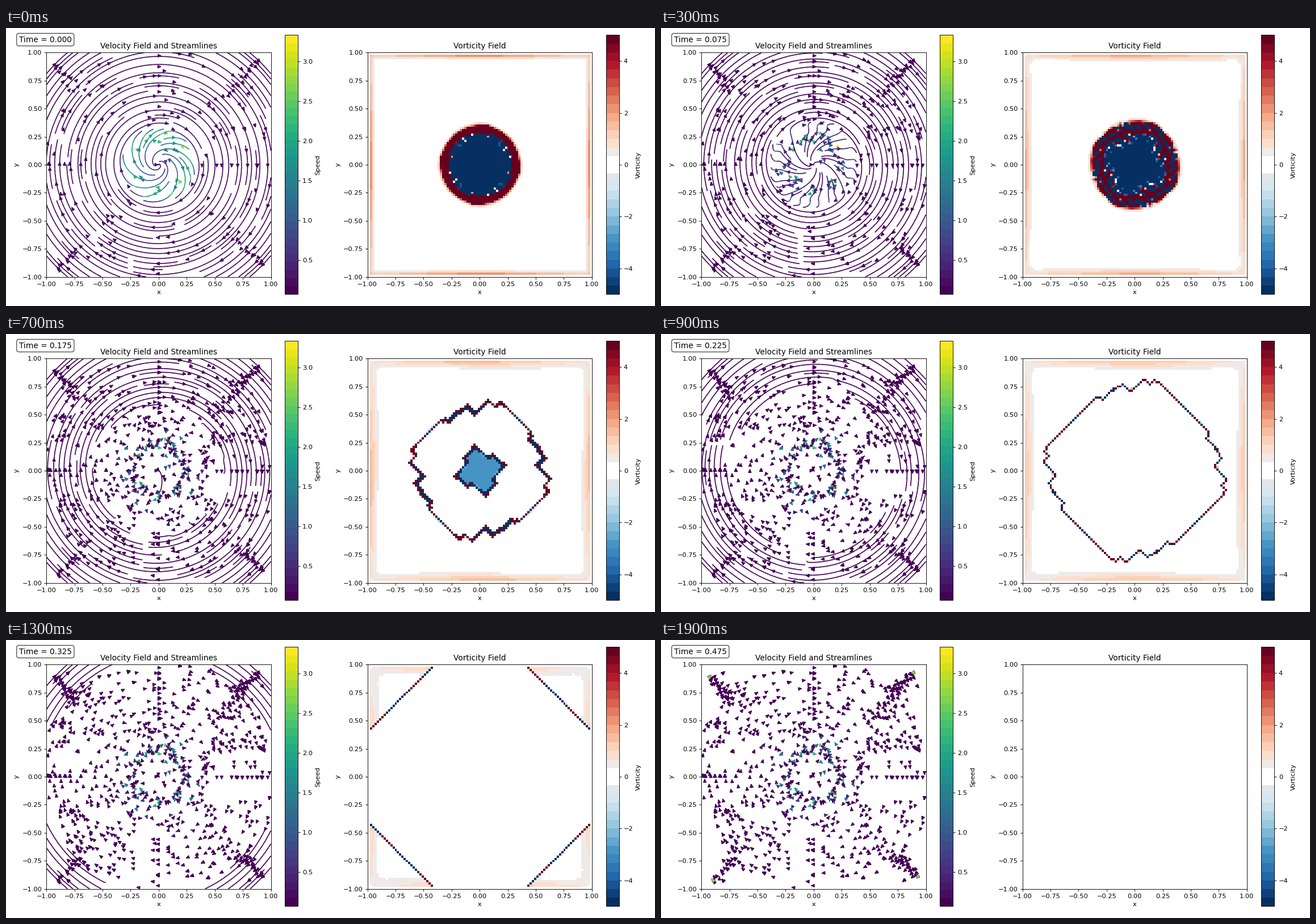
A matplotlib script for the animation above (2000 ms loop, 1143 by 490 pixels).

```python
import numpy as np
import matplotlib.pyplot as plt
from matplotlib.animation import FuncAnimation
from matplotlib.cm import ScalarMappable
from matplotlib.collections import PathCollection
from matplotlib.colors import ListedColormap, Normalize

W, H, DPI = 1143, 490, 81.65
PT = DPI / 72               # pixels per point
N, DT, NU, R = 100, 0.005, 0.005, 0.3
STEPS, FRAMES = 5, 20       # solver steps per frame
LEAD = 2                    # layers computed before the first shown frame
HUGE = 1e100

x = np.linspace(-1, 1, N)
dx = x[1] - x[0]
X, Y = np.meshgrid(x, x)


def ddx(f):
    return (f[1:-1, 2:] - f[1:-1, :-2]) / (2 * dx)


def ddy(f):
    return (f[2:, 1:-1] - f[:-2, 1:-1]) / (2 * dx)


def laplacian(f):
    return (f[1:-1, 2:] + f[1:-1, :-2] + f[2:, 1:-1] + f[:-2, 1:-1]
            - 4 * f[1:-1, 1:-1]) / dx**2


def initial_field():
    """Clockwise vortex: rigid core with a weak 1/r tail."""
    r = np.hypot(X, Y)
    spin = np.where(r < R, 1 / R**2, R**2 / r**2)
    return spin * Y, -spin * X


def step(u, v):
    """Explicit central-difference advection and diffusion, no-slip walls.

    The scheme is unstable here: noise grows in the ring until it overflows,
    and the invalid cells then spread by one cell per step.
    """
    ui, vi = u[1:-1, 1:-1], v[1:-1, 1:-1]
    out = []
    for f in (u, v):
        g = np.zeros_like(f)
        g[1:-1, 1:-1] = (f[1:-1, 1:-1] - DT * (ui * ddx(f) + vi * ddy(f))
                         + NU * DT * laplacian(f))
        out.append(g)
    return out


def vorticity(u, v):
    w = np.zeros_like(u)
    w[1:-1, 1:-1] = ddx(v) - ddy(u)
    w[~np.isfinite(w)] = np.nan
    return np.clip(w, -5, 5)


def solve():
    u, v = initial_field()
    states = [(u, v)]
    with np.errstate(all="ignore"):
        for _ in range(FRAMES + LEAD - 1):
            for _ in range(STEPS):
                u, v = step(u, v)
            states.append((u, v))
        return states, [vorticity(*s) for s in states]


def add_layer(ax, u, v):
    """Draw streamlines; return the line artist and one artist for all arrows."""
    with np.errstate(all="ignore"):
        bad = ~((np.abs(u) < HUGE) & (np.abs(v) < HUGE))
        u, v = np.where(bad, np.nan, u), np.where(bad, np.nan, v)
        speed = np.sqrt(u**2 + v**2)
        try:
            lines = ax.streamplot(x, x, u, v, color=speed, cmap="viridis",
                                  density=1.5, linewidth=1.5).lines
        except ValueError:      # no streamline is long enough any more
            lines = None
    paths, colors = [], []
    for p in list(ax.patches):
        p.set_mutation_scale(10 * PT)
        p.set_linewidth(1.5 * PT)
        p.shrinkA = p.shrinkB = 2 * PT
        paths.append(p.get_path())
        colors.append(p.get_facecolor())
        p.remove()
    arrows = None
    if paths:
        arrows = PathCollection(paths, facecolors=colors, edgecolors=colors,
                                linewidths=1.5, capstyle="round",
                                joinstyle="round", transform=ax.transData,
                                zorder=2)
        ax.add_collection(arrows, autolim=False)
    return lines, arrows


def pixel_axes(left, top, right, bottom):
    return fig.add_axes([left / W, 1 - bottom / H,
                         (right - left) / W, (bottom - top) / H])


def square_plot(left, title):
    ax = pixel_axes(left, 43.3, left + 395.3, 438.6)
    ticks = np.linspace(-1, 1, 9)
    ax.set(xlim=(-1, 1), ylim=(-1, 1), xticks=ticks, yticks=ticks,
           xlabel="x", ylabel="y", title=title)
    return ax


def color_bar(left, cmap, low, high, label):
    cax = pixel_axes(left, 12.5, left + 22.9, 469.5)
    fig.colorbar(ScalarMappable(Normalize(low, high), cmap), cax=cax,
                 label=label)


fig = plt.figure(figsize=(1143.001 / DPI, 490.001 / DPI), dpi=DPI,
                 facecolor="white")
flow_ax = square_plot(71.2, "Velocity Field and Streamlines")
vort_ax = square_plot(636.6, "Vorticity Field")

shades = plt.get_cmap("RdBu_r")(np.linspace(0, 1, 30))
shades[14:16] = 1
shades[13, :3] = 0.89, 0.90, 0.92
shades[16, :3] = 0.94, 0.92, 0.91
vort_cmap = ListedColormap(shades)

u0, v0 = initial_field()
speed0 = np.hypot(u0, v0)
color_bar(491, plt.get_cmap("viridis", 32), speed0.min(), speed0.max(), "Speed")
color_bar(1057, vort_cmap, -5, 5, "Vorticity")

states, vorts = solve()
layers = [add_layer(flow_ax, u, v) for u, v in states]
image = vort_ax.imshow(vorts[LEAD], cmap=vort_cmap, vmin=-5, vmax=5,
                       origin="lower", extent=(-1, 1, -1, 1), aspect="auto",
                       interpolation="nearest")
clock = fig.text(0.02, 0.95, "", fontsize=12,
                 bbox=dict(boxstyle="round", facecolor="white", alpha=0.8))


def update(i):
    now = i + LEAD
    for k, (lines, arrows) in enumerate(layers):
        if lines:
            lines.set_visible(k == now)
        if arrows:              # arrowheads pile up over the loop
            arrows.set_visible(k <= now)
    image.set_data(vorts[now])
    clock.set_text(f"Time = {i * STEPS * DT:.3f}")
    return []


anim = FuncAnimation(fig, update, frames=FRAMES, interval=100, repeat=True)
plt.show()
```
